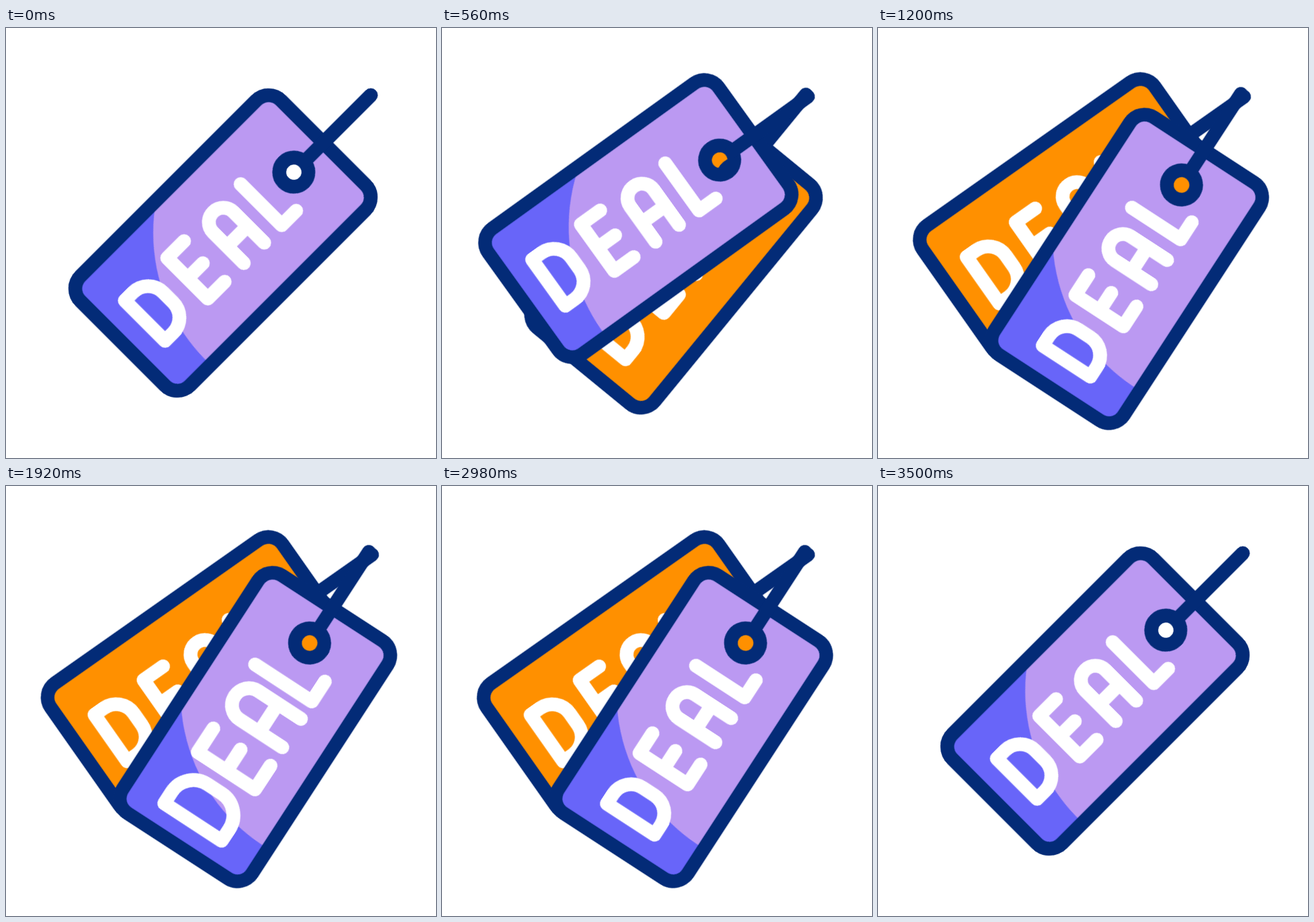
Animation of 640 by 640 pixels, one loop 3600 ms. Source, as an HTML page:

```html
<!DOCTYPE html>
<html lang="en">
<head>
<meta charset="utf-8">
<title>Deal tags</title>
<style>
  html, body { margin: 0; width: 100%; height: 100%; overflow: hidden; background: #fff; }
  svg { display: block; width: 100%; height: 100%; }

  .line { fill: none; stroke: #032b77; stroke-width: 20.4; stroke-linecap: round; }
  .word { fill: none; stroke: #fff; stroke-width: 20.6; stroke-linecap: round; stroke-linejoin: round; }

  /* letters grow without getting bolder */
  .letter { vector-effect: non-scaling-stroke; }

  /* both tags swing around a point on the string */
  .tag { transform-origin: 294px .5px; animation: 3.6s ease-in-out infinite; }
  .back { animation-name: swing-back; }
  .front { animation-name: swing-front; }

  .front .word use {
    transform-box: fill-box;
    transform-origin: center;
    animation: grow 3.6s calc(var(--i) * 15ms) ease-in-out infinite, wobble 3.6s ease-in-out infinite;
  }

  @keyframes swing-front {
    0%, 5.556% { transform: rotate(0deg); }
    17.5% { transform: rotate(9.8deg); }
    34.03%, 82.22% { transform: rotate(-12deg); }
    97.22%, 100% { transform: rotate(0deg); }
  }
  @keyframes swing-back {
    0%, 5.556% { transform: rotate(0deg); }
    17.5% { transform: rotate(-6deg); }
    34.03%, 82.22% { transform: rotate(9.9deg); }
    97.22%, 100% { transform: rotate(0deg); }
  }
  @keyframes grow {
    0%, 35% { scale: 1; }
    42% { scale: 1.34; }
    50% { scale: 1.14; }
    59% { scale: 1.36; }
    79%, 100% { scale: 1; }
  }
  @keyframes wobble {
    0%, 35% { rotate: 0deg; }
    39.58% { rotate: 14deg; }
    48.75% { rotate: -14deg; }
    57.92% { rotate: 14deg; }
    67.08% { rotate: -6deg; }
    75% { rotate: 12deg; }
    80.83%, 100% { rotate: 0deg; }
  }
</style>
</head>
<body>
<svg viewBox="0 0 640 640" role="img" aria-label="DEAL">
  <defs>
    <!-- rounded card with a punched hole -->
    <path id="card" d="M-185-115H185a26 26 0 0 1 26 26V89a26 26 0 0 1-26 26H-185a26 26 0 0 1-26-26V-89a26 26 0 0 1 26-26Z
      M127.3 0a21.8 21.8 0 0 0 43.6 0a21.8 21.8 0 0 0-43.6 0Z"/>
    <clipPath id="inside"><use href="#card" clip-rule="evenodd"/></clipPath>
    <g id="outline" class="line">
      <use href="#card"/>
      <path d="M171 0H311"/>
    </g>
    <path id="d" class="letter" d="M-164-42.8H-147a32 32 0 0 1 32 32V10a32 32 0 0 1-32 32H-164Z"/>
    <path id="e" class="letter" d="M-39-43H-74.5V42.5H-39M-74.5 0H-42.5"/>
    <path id="a" class="letter" d="M.7 43V-21.5a21.5 21.5 0 0 1 43 0V43M.7 8H43.7"/>
    <path id="l" class="letter" d="M80.5-43.5V43H111"/>
  </defs>

  <g transform="translate(323 320) rotate(-45)">
    <g class="tag back">
      <use href="#card" fill="#ff9000" fill-rule="evenodd"/>
      <g class="word"><use href="#d"/><use href="#e"/><use href="#a"/><use href="#l"/></g>
      <use href="#outline"/>
    </g>
    <g class="tag front">
      <g clip-path="url(#inside)">
        <path fill="#6865f9" d="M-211-115H211V115H-211Z"/>
        <circle fill="#bb99f2" cx="126.6" cy="105.4" r="268"/>
      </g>
      <use href="#outline"/>
      <g class="word">
        <use href="#d" style="--i:0"/>
        <use href="#e" style="--i:1"/>
        <use href="#a" style="--i:2"/>
        <use href="#l" style="--i:3"/>
      </g>
    </g>
  </g>
</svg>
</body>
</html>
```
